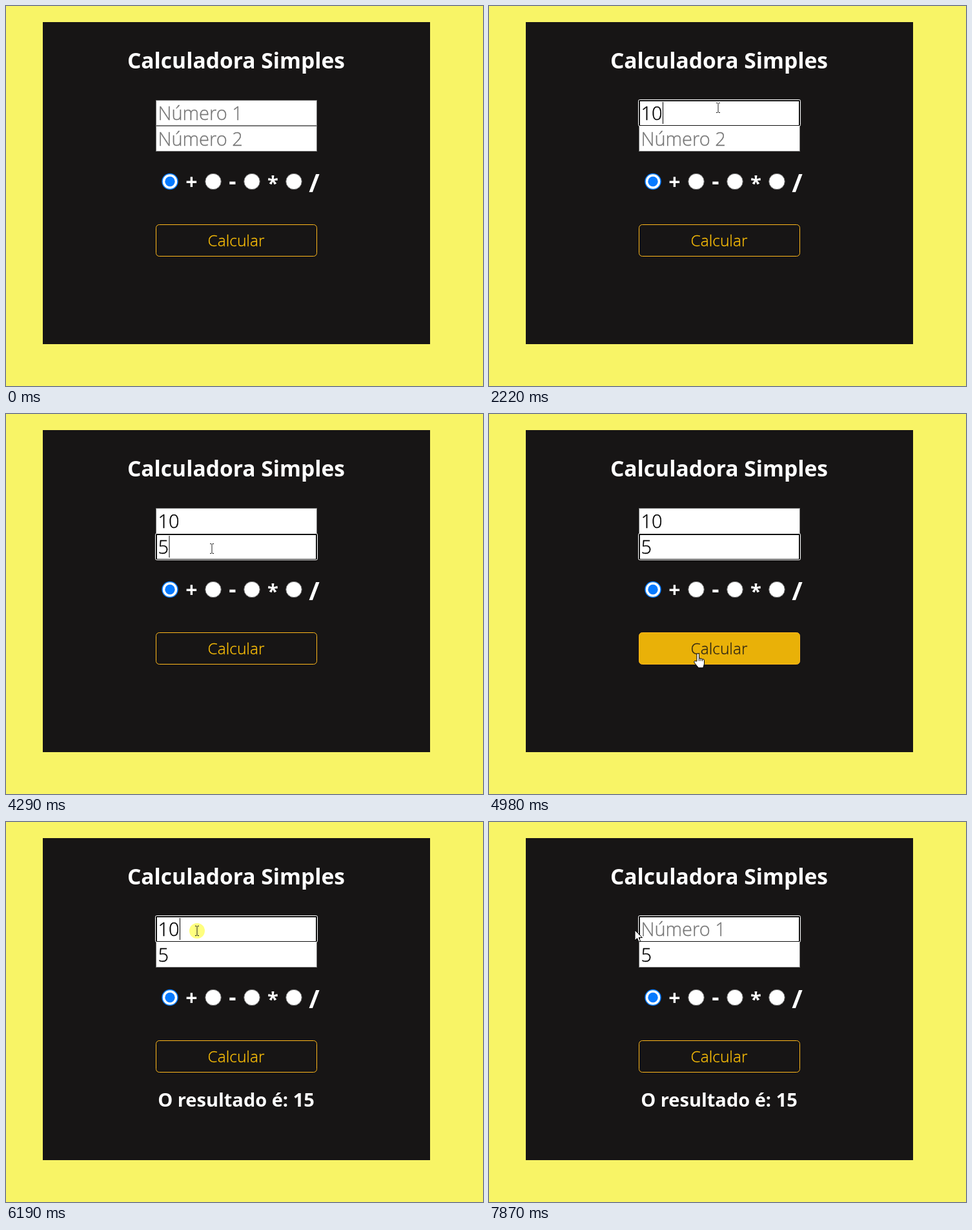
An HTML page that plays this animation: 739x590 px, repeating every 8000 ms.

```html
<!DOCTYPE html>
<html lang="pt">
<head>
<meta charset="utf-8">
<title>Calculadora Simples</title>
<style>
html, body { margin: 0; width: 100%; height: 100%; overflow: hidden; background: #f8f466; }
svg { display: block; width: 739px; height: 590px; }
text { font-family: "Noto Sans", "Open Sans", sans-serif; font-weight: 700; fill: #fff; white-space: pre; }
.thin { font-family: "Open Sans", "Noto Sans", sans-serif; font-weight: 300; font-size: 29px; fill: currentColor; stroke: currentColor; stroke-width: .3; }
.mid { text-anchor: middle; }
.field, .radio { fill: #fff; stroke: #767676; }
</style>
</head>
<body>
<svg viewBox="0 0 739 590">
  <rect width="739" height="590" fill="#f8f466"/>
  <rect x="57" y="25" width="600" height="500" fill="#171515"/>
  <text class="mid" x="356.5" y="97" font-size="33.6">Calculadora Simples</text>

  <rect class="field" x="232.5" y="146.5" width="249" height="39"/>
  <rect class="field" x="232.5" y="186.5" width="249" height="39"/>
  <g id="focus">
    <rect x="231.5" y="145.5" width="251" height="41" rx="2" fill="#101010" stroke="#fff"/>
    <rect x="234" y="148" width="246" height="37" fill="#fff"/>
  </g>
  <rect id="selection" y="149" height="35" fill="#0078d7"/>
  <text id="first" class="thin" x="235.5" y="177"></text>
  <text id="second" class="thin" x="235.5" y="217"></text>
  <rect id="caret" width="1" height="34"/>

  <circle cx="254" cy="272.5" r="12" fill="#fff" stroke="#057aff" stroke-width="1.5"/>
  <circle cx="254" cy="272.5" r="7.7" fill="#057aff"/>
  <circle class="radio" cx="321" cy="272.5" r="12.2"/>
  <circle class="radio" cx="381" cy="272.5" r="12.2"/>
  <circle class="radio" cx="446" cy="272.5" r="12.2"/>
  <text class="mid" x="287.5" y="284.5" font-size="32">+</text>
  <text class="mid" x="351" y="283.5" font-size="35">-</text>
  <text class="mid" x="413.5" y="286" font-size="31">*</text>
  <text class="mid" x="477.5" y="289" font-size="40">/</text>

  <rect id="button" x="232.5" y="339.5" width="249" height="49" rx="5" stroke="#ffb81c"/>
  <text id="label" class="thin mid" x="356.5" y="373" style="font-size:24.5px">Calcular</text>
  <text id="result" class="mid" x="356.5" y="442" font-size="29">O resultado é: 15</text>

  <g id="cursor">
    <circle id="press" r="12" fill="#ff0" fill-opacity=".5"/>
    <path id="arrow" d="M.5.5V16.5L4 13l2.5 5.5 2.5-1L6.7 12H12Z" fill="#fff" stroke="#000"/>
    <path id="beam" d="M-3-7.5H-1L0-6.5 1-7.5H3M0-6.5V6.5M-3 7.5H-1L0 6.5 1 7.5H3" fill="none" stroke="#222"/>
    <g id="hand" transform="translate(-6 -1)">
      <path d="M5 13V2.5a1.7 1.7 0 0 1 3.4 0V8.5q1.6-1 2.7.5 1.6-.7 2.6.7 2.8-.3 2.8 2V17l-1.7 6H7.5L1 15q-1-2 1-2.7Z" fill="#fff" stroke="#000"/>
      <path d="M8.4 8.5v4M11.1 9v3.5M13.7 9.7v3" stroke="#000" fill="none"/>
    </g>
  </g>
</svg>
<script>
const LOOP = 8000, BLINK = 530, FADE = 200;
const DARK = [23, 21, 21], AMBER = [255, 193, 7];

// Each click or key: time, focused field, both values
const EVENTS = [
  { at: 0, focus: 0, first: "", second: "" },
  { at: 830, focus: 1, first: "", second: "" },
  { at: 1890, focus: 1, first: "1", second: "" },
  { at: 2220, focus: 1, first: "10", second: "" },
  { at: 3700, focus: 2, first: "10", second: "" },
  { at: 4290, focus: 2, first: "10", second: "5" },
  { at: 5120, focus: 0, first: "10", second: "5" },
  { at: 6130, focus: 1, first: "10", second: "5" },
  { at: 7340, focus: 1, first: "", second: "5" }
];
// Pointer glides: start, end, destination
const START = [505, 540];
const MOVES = [
  [200, 830, 355, 158], [2950, 3400, 319, 209], [4640, 4900, 323, 372],
  [5700, 6080, 296, 169], [6200, 6590, 225.5, 167.5]
];
const PRESSES = [[830, 900], [3700, 3760], [5120, 5240], [6130, 6730]];

const $ = id => document.getElementById(id);
const show = (id, on) => $(id).style.display = on ? "" : "none";
const ramp = (t, from, to) => Math.min(1, Math.max(0, (t - from) / (to - from)));
const smooth = p => p * p * (3 - 2 * p);
const easeOut = p => p * (2 - p);
const mix = (a, b, p) => `rgb(${a.map((v, i) => Math.round(v + (b[i] - v) * p))})`;
const inBox = (x, y, top, bottom) => x > 232 && x < 482 && y > top && y < bottom;

// Sideways motion runs ahead of the vertical, which bends the path
function pointer(t) {
  let [x, y] = START;
  for (const [from, to, toX, toY] of MOVES) {
    const p = smooth(ramp(t, from, to));
    x += (toX - x) * easeOut(p);
    y += (toY - y) * p;
  }
  return [x, y];
}

function drawCursor(t, x, y) {
  const onButton = inBox(x, y, 339, 389);
  const onText = inBox(x, y, 146, 226) || Math.hypot(x - 290, y - 265) < 15;
  show("cursor", t >= MOVES[0][0]);
  show("press", PRESSES.some(([down, up]) => t >= down && t < up));
  show("hand", onButton);
  show("beam", onText);
  show("arrow", !onButton && !onText);
  $("cursor").setAttribute("transform", `translate(${x} ${y})`);
}

function drawField(id, value, hint, picked = 0) {
  const cut = value.length - picked;
  $(id).style.color = value ? "#000" : "#757575";
  $(id).innerHTML = value
    ? `${value.slice(0, cut)}<tspan style="color:#fff">${value.slice(cut)}</tspan>`
    : hint;
}

function drawButton(t) {
  const fade = at => ramp(t, at, at + FADE);
  const hover = fade(460) - fade(520) + fade(4800) - fade(5780);
  $("button").style.fill = mix(DARK, AMBER, hover);
  $("label").style.color = mix(AMBER, DARK, hover);
}

function draw(now) {
  const t = now % LOOP;
  const { at, focus, first, second } = EVENTS.findLast(e => t >= e.at);
  const [x, y] = pointer(t);

  // Dragging left selects the digits passed over
  const dragged = t >= 6200 && first;
  const picked = dragged ? (x < 245 ? 2 : x < 261 ? 1 : 0) : 0;
  show("selection", picked);
  $("selection").setAttribute("x", 269 - 16 * picked);
  $("selection").setAttribute("width", 16 * picked);
  drawField("first", first, "Número 1", picked);
  drawField("second", second, "Número 2");

  const drop = focus === 2 ? 40 : 0;
  show("focus", focus);
  $("focus").setAttribute("transform", `translate(0 ${drop})`);
  show("caret", focus && !picked && Math.floor((t - at) / BLINK) % 2 === 0);
  $("caret").setAttribute("x", 236 + 16.5 * (focus === 2 ? second : first).length);
  $("caret").setAttribute("y", 149 + drop);

  drawButton(t);
  show("result", t >= 5240);
  drawCursor(t, x, y);
  requestAnimationFrame(draw);
}
requestAnimationFrame(draw);
</script>
</body>
</html>
```
